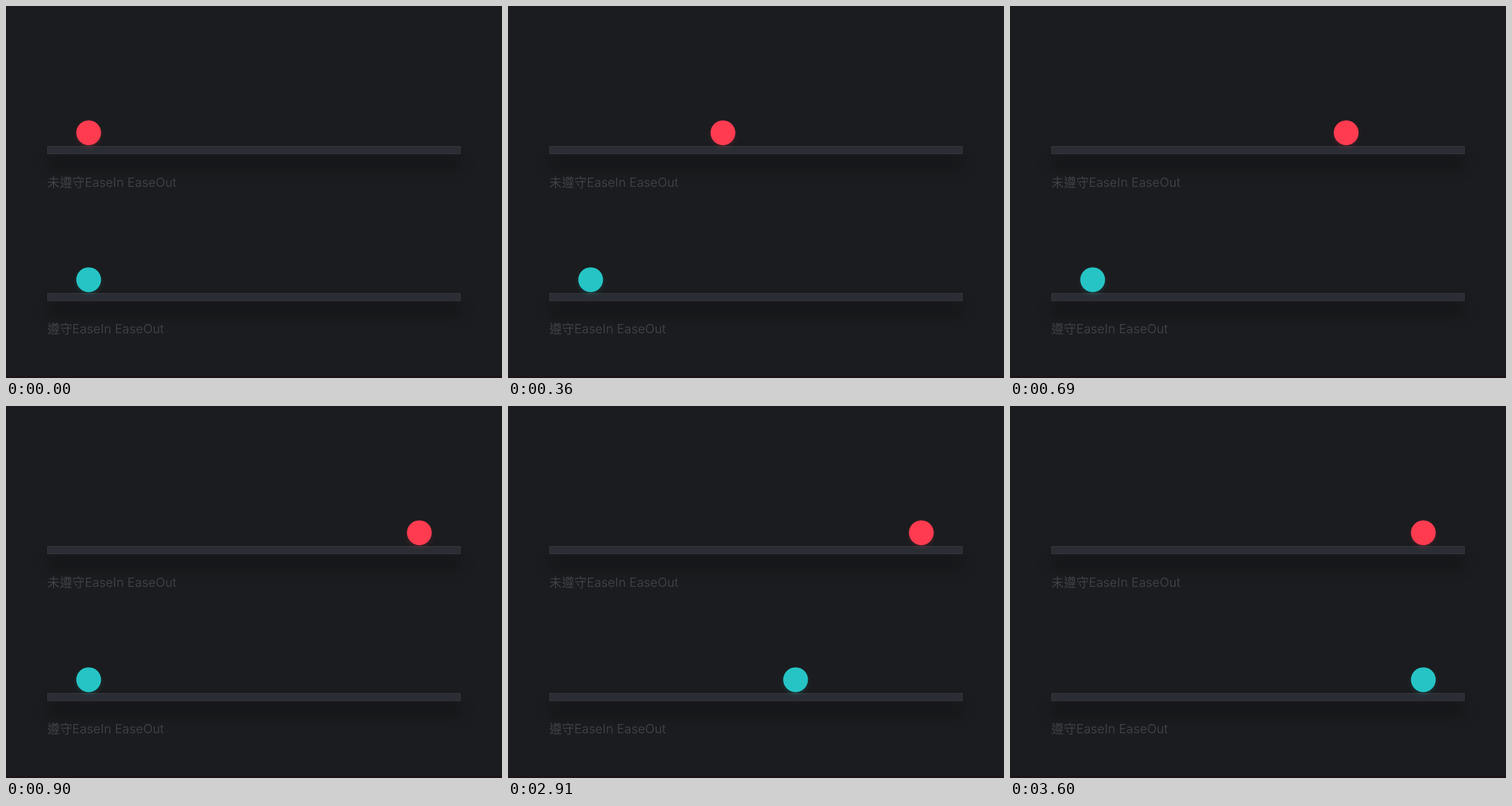
An HTML page for the animation above (4500 ms loop, 864 px wide and 648 px high).

```html
<!DOCTYPE html>
<html lang="zh-Hant">
<head>
<meta charset="utf-8">
<style>
  html, body { margin: 0; width: 100%; height: 100%; overflow: hidden; background: #1b1c1f; }
  .track, .edge { position: absolute; box-sizing: border-box; }
  .track {
    left: 72px; width: 720px; height: 14px;
    background: #2b2d34; border: 1px solid #38393e;
    box-shadow: 0 22px 26px rgba(0, 0, 0, .38);
  }
  .edge { left: 0; top: 644px; width: 864px; height: 4px; background: #1d151a; }
  svg { position: absolute; left: 0; top: 0; }
  .red { fill: #ff3b50; }
  .teal { fill: #26c4c5; }
  .glow { opacity: .22; filter: blur(4px); }
  text {
    font: 300 21.6px Inter, "Noto Sans CJK TC", "Noto Sans CJK", sans-serif;
    letter-spacing: .2px; fill: #47484c;
  }
  .han { fill: #404145; }
</style>
</head>
<body>
<div class="track" style="top:244px"></div>
<div class="track" style="top:500px"></div>
<div class="edge"></div>
<svg width="864" height="648">
  <g class="red">
    <circle class="glow" cy="225" r="20"/>
    <circle cy="220.8" r="21.6"/>
  </g>
  <g class="teal">
    <circle class="glow" cy="481" r="20"/>
    <circle cy="476.8" r="21.6"/>
  </g>
  <text x="72" y="315"><tspan class="han">未遵守</tspan>EaseIn EaseOut</text>
  <text x="72" y="570"><tspan class="han">遵守</tspan>EaseIn EaseOut</text>
</svg>
<script>
const LOOP = 4500, STEP = 30, MOVE = 900, TEAL_START = 2700;
const START_X = 144, DISTANCE = 576;
const red = document.querySelector('.red');
const teal = document.querySelector('.teal');

const clamp = v => Math.min(1, Math.max(0, v));

// cubic-bezier(.123, 0, 0, 1), solved by bisection
function ease(x) {
  if (x <= 0 || x >= 1) return clamp(x);
  let lo = 0, hi = 1;
  for (let i = 0; i < 30; i++) {
    const s = (lo + hi) / 2;
    if (3 * .123 * s * (1 - s) ** 2 + s ** 3 < x) lo = s; else hi = s;
  }
  return lo * lo * (3 - 2 * lo);
}

function place(ball, progress) {
  ball.setAttribute('transform', `translate(${START_X + DISTANCE * progress} 0)`);
}

function draw() {
  const t = Math.floor(performance.now() % LOOP / STEP) * STEP;
  place(red, clamp(t / MOVE));
  place(teal, ease(clamp((t - TEAL_START) / MOVE)));
  requestAnimationFrame(draw);
}
draw();
</script>
</body>
</html>
```
